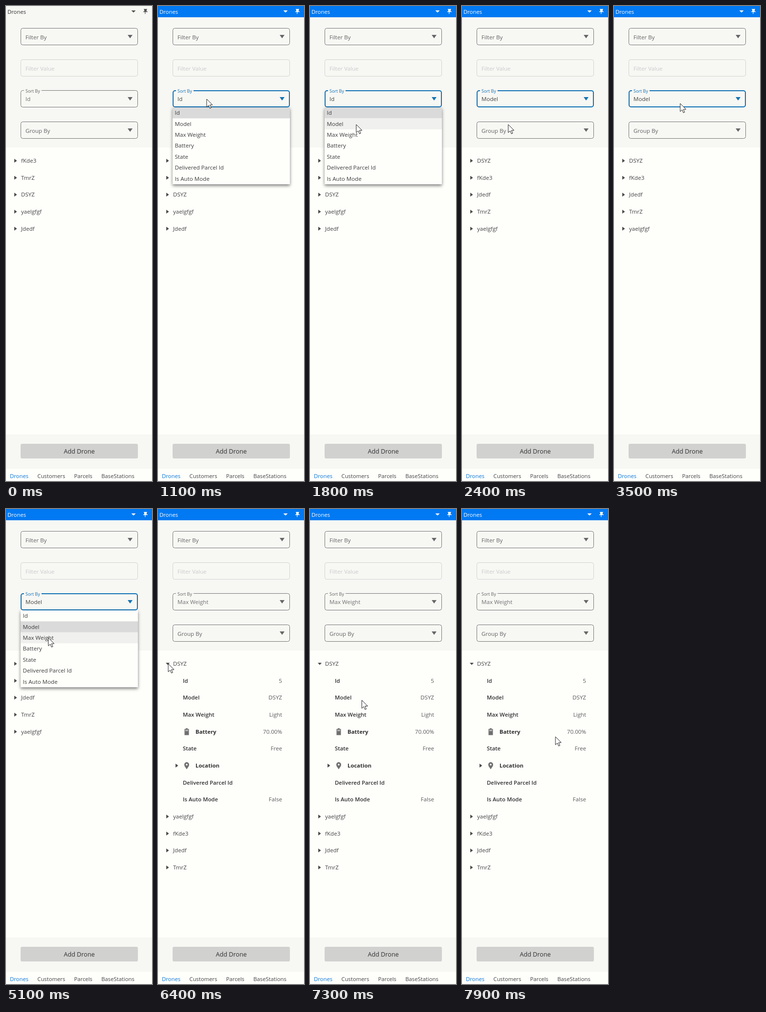
An HTML page for the animation above (8 s loop, 300 by 970 pixels).

```html
<!DOCTYPE html>
<html lang="en">
<head>
<meta charset="utf-8">
<title>Drones panel</title>
<style>
html, body { margin: 0; width: 100%; height: 100%; overflow: hidden; }
svg { display: block; width: 300px; height: 970px; font: 11.6px "Open Sans", sans-serif; }
text { white-space: pre; }
.shadow { filter: drop-shadow(0 3px 3px rgba(40, 40, 40, .6)); }
</style>
</head>
<body>
<svg viewBox="0 0 300 970"><g id="scene"></g>
<path id="cursor" d="M0 0V16.5L4 13L6.6 19L9.2 17.9L6.6 12H12Z" fill="#fff" stroke="#222" stroke-width="1"/></svg>
<script>
const LOOP = 8000, STEP = 100, PITCH = 34.67, EXPAND = 6060;
const PANEL = '#f7f7f4', LIST = '#fefefb', INK = '#444', SOFT = '#636363', BLUE = '#1272b4';
const options = ['Id', 'Model', 'Max Weight', 'Battery', 'State', 'Delivered Parcel Id', 'Is Auto Mode'];
const orders = {
  'Id': ['fKde3', 'TmrZ', 'DSYZ', 'yaelgfgf', 'Jdedf'],
  'Model': ['DSYZ', 'fKde3', 'Jdedf', 'TmrZ', 'yaelgfgf'],
  'Max Weight': ['DSYZ', 'yaelgfgf', 'fKde3', 'Jdedf', 'TmrZ']
};
const details = [['Id', '5'], ['Model', 'DSYZ'], ['Max Weight', 'Light'], ['Battery', '70.00%'],
  ['State', 'Free'], ['Location', ''], ['Delivered Parcel Id', ''], ['Is Auto Mode', 'False']];
// time, x, y of the pointer tip
const track = [[100, 305, 300], [800, 100, 190], [1200, 100, 190], [1700, 95, 242], [2700, 95, 242],
  [3400, 136, 199], [4200, 136, 199], [4900, 87, 263], [5400, 87, 263],
  [6000, 21, 316], [6700, 21, 316], [7900, 192, 465], [LOOP + 1, 192, 465]];

const rect = (x, y, w, h, fill, more = '') => `<rect x="${x}" y="${y}" width="${w}" height="${h}" fill="${fill}" ${more}/>`;
const text = (x, y, s, fill = INK, more = '') => `<text x="${x}" y="${y}" fill="${fill}" ${more}>${s}</text>`;
const shape = (d, fill) => `<path d="${d}" fill="${fill}"/>`;

function pointerAt(t) {
  const i = track.findIndex(k => k[0] > t);
  if (i < 1) return [-50, -50];
  const [t0, x0, y0] = track[i - 1], [t1, x1, y1] = track[i];
  const u = (t - t0) / (t1 - t0), e = u * u * (3 - 2 * u);
  return [x0 + (x1 - x0) * e, y0 + (y1 - y0) * e];
}

function header(active) {
  const ink = active ? '#fff' : '#555';
  return rect(0, 0, 300, 23, active ? '#0079f2' : PANEL) +
    text(3, 16, 'Drones', active ? '#fff' : '#333', 'font-size="11.3"') +
    shape('M257.5 9h9l-4.5 4.5z', ink) +
    shape('M283 6h7v1h-1v4h2v1.3h-4.4v4h-1.2v-4H282V11h2V7h-1z', ink);
}

function field(y, label, { value, focus, disabled } = {}) {
  const edge = focus ? BLUE : disabled ? '#d2d2d2' : '#777', line = focus ? 2 : 1;
  let s = rect(30 + line / 2, y + line / 2, 241 - line, 35 - line, 'none', `rx="4" stroke="${edge}" stroke-width="${line}"`);
  if (value) s += rect(37, y - 1, 36, 4, PANEL) +
    text(40, y + 4.5, label, focus ? BLUE : SOFT, 'font-size="9"') +
    text(40, y + 21.5, value, focus ? INK : '#707070');
  else s += text(40, y + 23, label, disabled ? '#cbcbcb' : SOFT);
  return disabled ? s : s + shape(`M250 ${y + 14}h10l-5 7z`, focus ? BLUE : '#666');
}

const arrow = (x, y, open) => shape(open ? `M${x - 1} ${y - 2}h8l-4 4.5z` : `M${x} ${y - 4}l5.5 4l-5.5 4z`, '#4c4c4c');

function detail([name, value], y) {
  const icon = name == 'Battery' || name == 'Location';
  let s = text(icon ? 77 : 51, y + 4, name, '#303030', `font-weight="${icon ? 700 : 600}" font-size="11.4"`) +
    text(255, y + 4, value, '#5a5a5a', 'text-anchor="end"');
  if (name == 'Battery')
    s += shape(`M57 ${y - 7}h4v1.6h2.5V${y + 7}h-9V${y - 5.4}H57z`, '#707070') + rect(56, y - 4, 6, 3, '#b5b5b5');
  if (name == 'Location')
    s += arrow(36, y) + shape(`M59 ${y + 7.5}C56 ${y + 3} 54 ${y + 1} 54 ${y - 2}a5 5 0 0 1 10 0C64 ${y + 1} 62 ${y + 3} 59 ${y + 7.5}z`, '#707070') +
      `<circle cx="59" cy="${y - 2}" r="1.8" fill="${LIST}"/>`;
  return s;
}

// the first item's details unfold downwards by the factor grow
function tree(names, grow) {
  const first = 316, below = first + PITCH / 2, shift = grow * details.length * PITCH;
  let s = names.map((name, i) => {
    const y = first + PITCH * i + (i && shift);
    return arrow(17, y, grow && !i) + text(31, y + 4, name);
  }).join('');
  if (grow) s += `<g opacity="${grow}" transform="translate(0 ${below}) scale(1 ${grow})">` +
    details.map((d, i) => detail(d, PITCH * (i + .5))).join('') + '</g>';
  return s;
}

function popup(selected, hover) {
  let s = rect(30, 207, 241, 157, LIST, 'class="shadow"');
  options.forEach((name, i) => {
    const y = 207 + 22.43 * i, fill = name == selected ? '#dadada' : i == hover ? '#f0f0ee' : 0;
    if (fill) s += rect(30, y, 241, 22.43, fill);
    s += text(34.5, y + 15.2, name, '#3c3c3c');
  });
  return s;
}

function scene(t, [px, py]) {
  const active = t >= 900, focus = active && t < EXPAND;
  const sort = t < 1900 ? 'Id' : t < 5300 ? 'Model' : 'Max Weight';
  const open = t >= 1000 && t < 1900 || t >= 3700 && t < 5300;
  const hover = px > 30 && px < 271 ? Math.floor((py - 207) / 22.43) : -1;
  const grow = Math.min(1, Math.max(0, (t - EXPAND) / 300));
  return rect(0, 0, 300, 970, LIST) + rect(0, 23, 300, 266, PANEL) + rect(0, 875, 300, 70, PANEL) +
    header(active) + field(45, 'Filter By') + field(109, 'Filter Value', { disabled: true }) +
    field(172, 'Sort By', { value: sort, focus }) + field(236, 'Group By') +
    tree(orders[sort], grow) + (open ? popup(sort, hover) : '') +
    rect(30, 894, 241, 30, '#d1d1d0', 'rx="3"') +
    text(150.5, 914, 'Add Drone', '#303030', 'font-size="12.7" text-anchor="middle"') +
    [['Drones', 8], ['Customers', 64.5], ['Parcels', 140], ['BaseStations', 196]].map(([name, x], i) =>
      text(x, 964, name, i ? INK : '#0c78d8', 'font-size="11.3"')).join('');
}

const sceneEl = document.getElementById('scene'), cursorEl = document.getElementById('cursor');
let shown = -1;
function frame(now) {
  const t = Math.floor(now % LOOP / STEP) * STEP;
  if (t != shown) {
    shown = t;
    const p = pointerAt(t);
    sceneEl.innerHTML = scene(t, p);
    cursorEl.setAttribute('transform', `translate(${p})`);
  }
  requestAnimationFrame(frame);
}
frame(performance.now());
</script>
</body>
</html>
```
